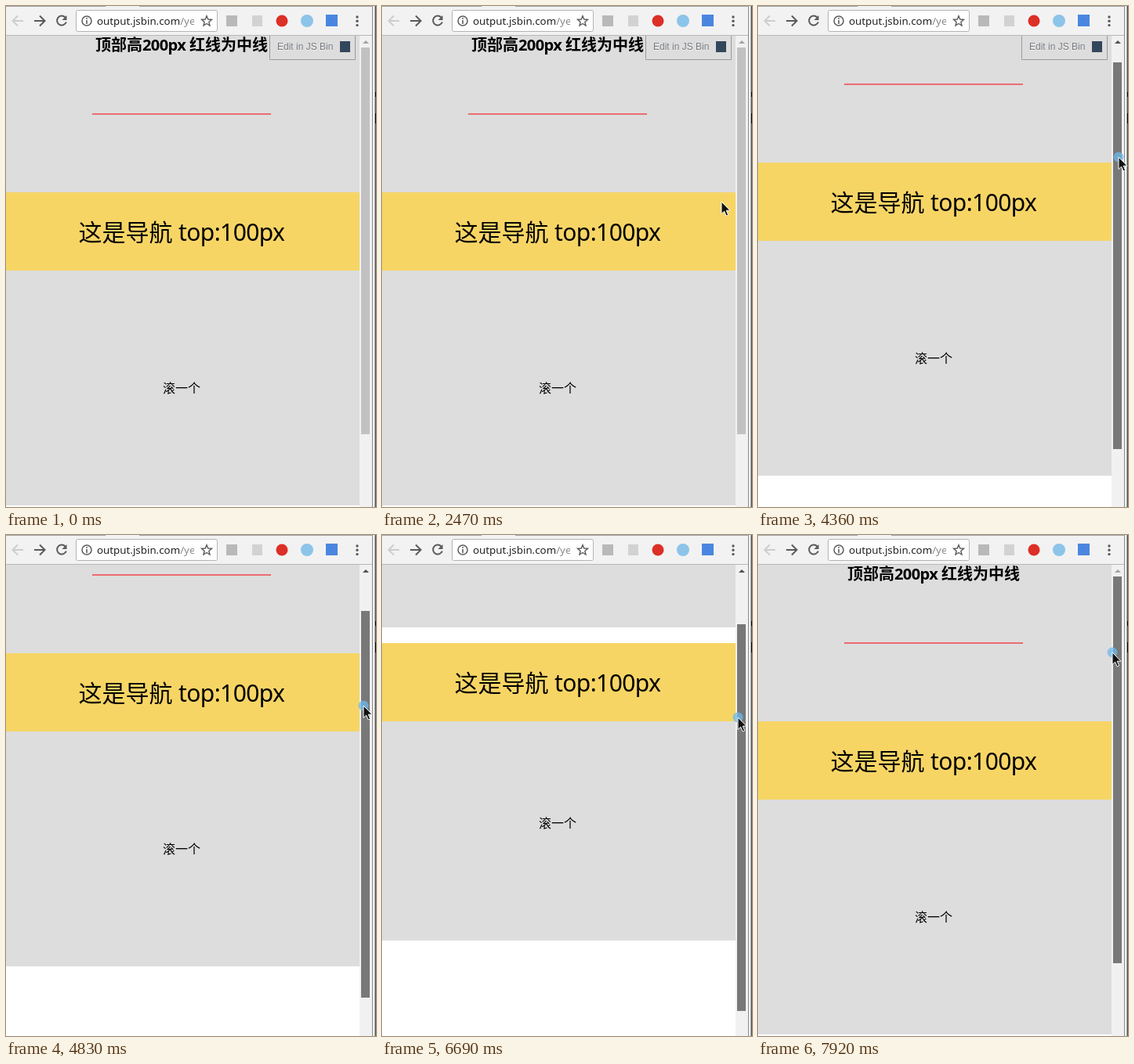
An HTML page for the animation above (7990 ms loop, 472 by 640 pixels).

```html
<!DOCTYPE html>
<html lang="zh">
<head>
<meta charset="utf-8">
<title>Sticky navigation</title>
<style>
html, body { margin: 0; width: 100%; height: 100%; overflow: hidden; background: #fff; }
svg { display: block; width: 472px; height: 640px; }
text { font-family: "Noto Sans", "Noto Sans CJK SC", "Noto Sans CJK", sans-serif; }
.cjk { font-family: "Noto Sans CJK SC", "Noto Sans CJK", sans-serif; }
.title { font-size: 20px; font-weight: 700; }
.nav { font-size: 30px; }
.tight { letter-spacing: -.6px; }
.url { font-size: 13.33px; }
.edit { font: 12px "Liberation Sans", Arial, sans-serif; fill: #777b82; text-shadow: 0 1px 0 #f4f4f4; }
.icon { fill: none; stroke: #5a5a5a; stroke-width: 2; }
</style>
</head>
<body>
<svg viewBox="0 0 472 640">
  <defs>
    <clipPath id="view"><rect y="38" width="451" height="602"/></clipPath>
    <clipPath id="address"><rect x="112" y="6" width="128" height="27"/></clipPath>
  </defs>
  <rect width="472" height="640" fill="#fff"/>

  <g clip-path="url(#view)">
    <g id="page">
      <rect y="38" width="451" height="200" fill="#ddd"/>
      <rect y="338" width="451" height="300" fill="#ddd"/>
      <g class="title">
        <text class="cjk" x="114" y="57">顶部高</text>
        <text class="tight" x="174" y="57">200px</text>
        <text class="cjk" x="234" y="57">红线为中线</text>
      </g>
      <rect x="110" y="137" width="228" height="2" fill="#ec6b72"/>
      <text class="cjk" x="200" y="494" font-size="16">滚一个</text>
    </g>
    <g id="nav" class="nav">
      <rect y="238" width="451" height="100" fill="#f7d565"/>
      <text class="cjk" x="92.5" y="300">这是导航</text>
      <text class="tight" x="220" y="300">top:100px</text>
    </g>
    <g id="edit">
      <path d="M336.5 37V68.5H445.5V37" fill="#ddd" stroke="#9a9a9a"/>
      <text class="edit" x="346" y="56">Edit in JS Bin</text>
      <rect x="426" y="45" width="13" height="14" fill="#33475c"/>
    </g>
  </g>

  <rect x="451" y="38" width="16" height="602" fill="#f1f1f1"/>
  <path id="up" d="M455 48L459 44L463 48Z"/>
  <rect id="thumb" x="453" y="53" width="11" height="494"/>

  <rect width="467" height="38" fill="#f2f2f2"/>
  <path d="M0 .5H467" stroke="#a3a3a3"/>
  <path d="M127 .5H170" stroke="#f2f2f2"/>
  <path d="M0 37.5H467" stroke="#b8b8b8"/>
  <g class="icon">
    <path d="M22 19H9M15 12.5L8.500 19L15 25.500" stroke="#cdcdcd"/>
    <path d="M36 19H49M43 12.500L49.500 19L43 25.500"/>
    <path d="M75.500 14.500A6 6 0 1 0 76.800 20.500"/>
    <path d="M77.500 12V18H71.500Z" fill="#5a5a5a" stroke="none"/>
  </g>
  <rect x="89.500" y="5.500" width="180" height="27" rx="2" fill="#fff" stroke="#b3b3b3"/>
  <circle cx="103" cy="19" r="6" class="icon" style="stroke-width:1.500"/>
  <path d="M103 15V16.700M103 18V23" class="icon" style="stroke-width:1.600"/>
  <g clip-path="url(#address)">
    <text class="url" x="116" y="24" fill="#222">output.jsbin.com<tspan fill="#8a8a8a">/yexi</tspan></text>
  </g>
  <path id="star" class="icon" style="stroke-width:1.400"/>
  <rect x="281" y="12" width="14" height="14" fill="#b9b9b9"/>
  <rect x="314" y="12" width="13" height="14" fill="#d2d2d2"/>
  <circle cx="352" cy="19" r="7.500" fill="#dc2f26"/>
  <circle cx="384" cy="19" r="8" fill="#8cc4ea"/>
  <rect x="408" y="11" width="15" height="15" fill="#4a86e0"/>
  <g fill="#5a5a5a">
    <circle cx="448" cy="14" r="1.700"/><circle cx="448" cy="19.300" r="1.700"/><circle cx="448" cy="24.600" r="1.700"/>
  </g>

  <rect x="467" width="1" height="640" fill="#8a8a8a"/>
  <rect x="468" width="3" height="640" fill="#f4f4f4"/>
  <rect x="470.500" width="1.500" height="640" fill="#555"/>
  <path d="M471.500 110V116M471.500 137V150" stroke="#000"/>

  <g id="cursor">
    <circle id="halo" r="6.500" fill="#6db9ec" fill-opacity=".75"/>
    <path d="M0 0V15.500L3.600 12.200L6.200 18L8.700 16.900L6.200 11.200H11Z" fill="#111" stroke="#fff" stroke-width="1"/>
  </g>
</svg>
<script>
const LOOP = 7990;
const el = id => document.getElementById(id);
const [page, nav, edit, thumb, up, cursor, halo] =
  ["page", "nav", "edit", "thumb", "up", "cursor", "halo"].map(el);

// [time, value...]
const scrollKeys = [
  [3330, 0], [3620, 9], [4160, 27], [4360, 38], [4990, 104],
  [5440, 133], [5820, 168], [5960, 170], [6610, 133], [6690, 120],
  [7440, 15], [7560, 0]
];
const cursorKeys = [
  [1220, 472, 438], [1480, 330, 270], [1800, 140, 60], [1900, 118, 33],
  [2000, 130, 54], [2470, 433, 250], [2570, 455, 236], [2800, 455, 236],
  [3270, 459, 175], [3620, 459, 179], [4360, 460, 193], [4990, 454, 227],
  [5440, 450, 242], [5890, 451, 261], [6690, 454, 233], [7920, 452, 150]
];

function at(keys, t) {
  const i = keys.findIndex(k => k[0] > t);
  if (i === 0) return keys[0].slice(1);
  if (i < 0) return keys[keys.length - 1].slice(1);
  const a = keys[i - 1], b = keys[i];
  const p = (t - a[0]) / (b[0] - a[0]);
  return a.slice(1).map((v, j) => v + (b[j + 1] - v) * p);
}

const shift = (node, x, y) => node.setAttribute("transform", `translate(${x} ${y})`);

function starPath(cx, cy) {
  const points = Array.from({ length: 10 }, (_, i) => {
    const r = i % 2 ? 3 : 6.8, a = (i * 36 - 90) * Math.PI / 180;
    return `${cx + r * Math.cos(a)} ${cy + r * Math.sin(a)}`;
  });
  return "M" + points.join("L") + "Z";
}

function draw(t) {
  const s = Math.round(at(scrollKeys, t)[0]);
  shift(page, 0, -s);
  shift(nav, 0, -Math.min(s, 100));
  shift(thumb, 0, Math.round(s * 0.511 - 0.2));
  up.setAttribute("fill", s ? "#505050" : "#a3a3a3");

  const pressed = t >= 3270;
  thumb.setAttribute("fill", pressed ? "#787878" : t >= 2570 ? "#a8a8a8" : "#c1c1c1");

  const hide = Math.min(1, Math.max(0, (t - 4700) / 200));
  shift(edit, 0, -60 * (1 - (1 - hide) ** 2));

  const [x, y] = at(cursorKeys, t);
  shift(cursor, Math.round(x), Math.round(y));
  cursor.style.display = t < 1220 ? "none" : "";
  halo.style.display = pressed ? "" : "none";
}

el("star").setAttribute("d", starPath(256, 19.5));
const start = performance.now();
function tick() {
  draw((performance.now() - start) % LOOP);
  requestAnimationFrame(tick);
}
draw(0);
requestAnimationFrame(tick);
</script>
</body>
</html>
```
